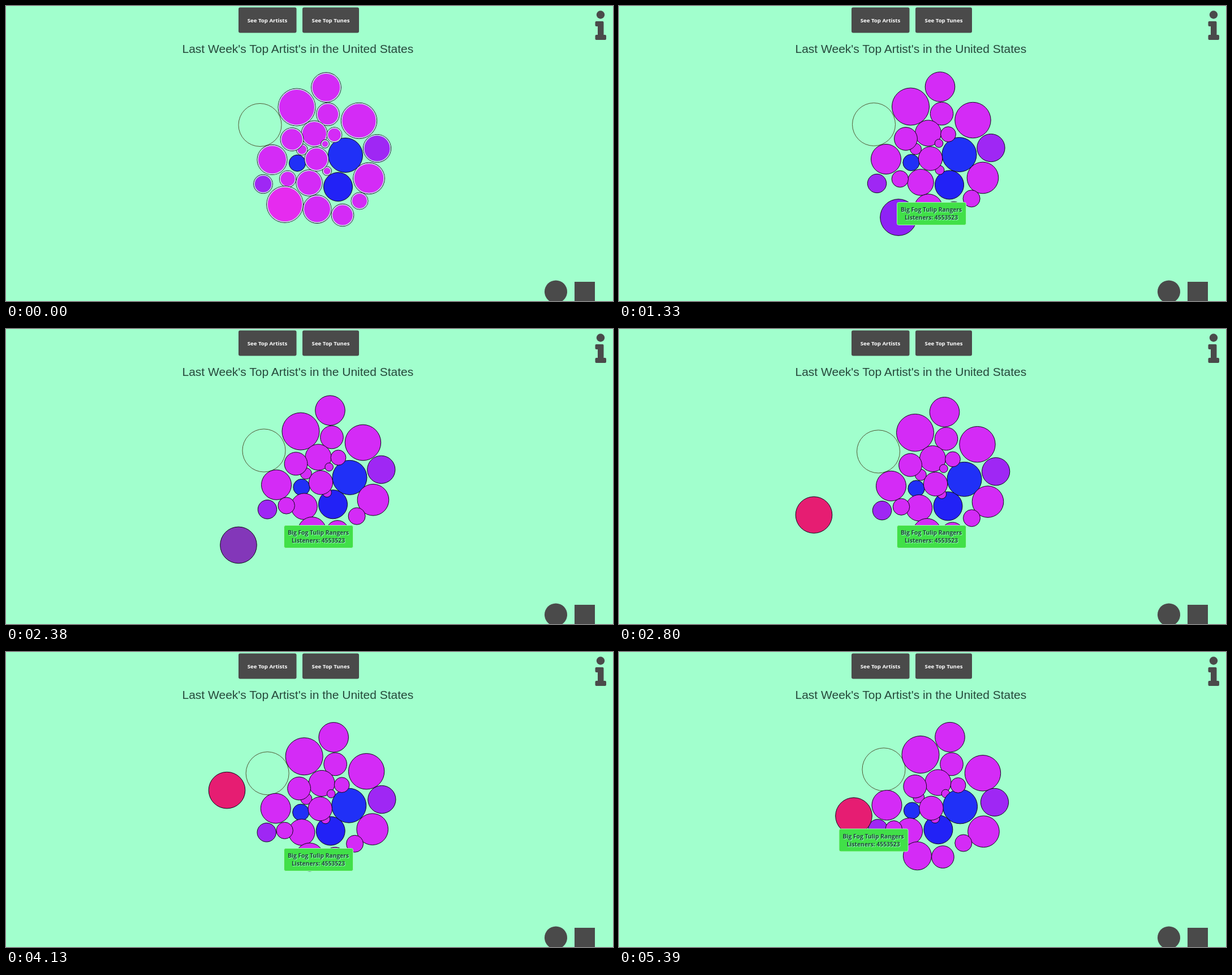
Recreate the animation shown at these times as an HTML page. Size 1073x522 px, loop 5.46 s.

```html
<!DOCTYPE html>
<html lang="en">
<head>
<meta charset="utf-8">
<title>Top artists bubbles</title>
<style>
  html, body { margin: 0; width: 100%; height: 100%; overflow: hidden; background: #a1ffcd; }
  svg { display: block; width: 1073px; height: 522px; }
  h1 {
    position: absolute; left: 311.5px; top: 64px; margin: 0; white-space: nowrap;
    font: 21px/24px "Liberation Sans", Arial, sans-serif; color: #26493b;
  }
  .ui { fill: #4a4a4a; }
  .btn { font: bold 9.65px "Open Sans", "Noto Sans", sans-serif; fill: #fff; text-anchor: middle; }
  .tip rect { fill: #41e048; stroke: #a0f8b4; stroke-width: 1; }
  .tip text {
    font: bold 10.3px "Open Sans", "Noto Sans", sans-serif;
    fill: #1f4738; text-anchor: middle; text-shadow: 1px 1px 1px #a1ffcd;
  }
  .bubble { stroke: #0c0818; stroke-width: 1; }
  .hollow { stroke: #3a2c0c; stroke-width: .8; }
  .ring { fill: none; stroke: #c4f8e4; stroke-width: 1.5; }
</style>
</head>
<body>
<h1>Last Week's Top Artist's in the United States</h1>
<svg viewBox="0 0 1073 522">
  <defs><clipPath id="area"><rect width="1073" height="422"/></clipPath></defs>
  <rect class="ui" x="411" y="2.5" width="102.5" height="45" rx="3"/>
  <rect class="ui" x="524" y="2.5" width="100" height="45" rx="3"/>
  <text class="btn" x="462" y="29">See Top Artists</text>
  <text class="btn" x="574" y="29">See Top Tunes</text>
  <g class="ui">
    <circle cx="1051" cy="15.5" r="7.2"/>
    <path d="M1043.5 27h11q2 0 2 2v22h2.5q2 0 2 2v5q0 2-2 2h-15.5q-2 0-2-2v-5q0-2 2-2h2.5v-15h-2.5q-2 0-2-2v-5q0-2 2-2z"/>
    <circle cx="972" cy="505.5" r="20"/>
    <rect x="1005" y="488" width="36" height="36"/>
  </g>
  <g id="bubbles" clip-path="url(#area)"></g>
  <g id="tip" class="tip">
    <rect x=".5" y=".5" width="122" height="40" rx="3"/>
    <text x="61" y="17">Big Fog Tulip Rangers</text>
    <text x="61" y="31">Listeners: 4553523</text>
  </g>
</svg>
<script>
const LOOP = 5460, STEP = 70;
const PINK = "#d42bf6", BLUE = "#2030f7", NAVY = "#2222f6", VIOLET = "#9f27f4";

// Resting cluster, back to front: x, y, radius, fill
const cluster = [
  [523, 254, 10], [449, 210.5, 38, "none"], [566, 144, 26.3], [514, 179, 33],
  [569, 191.5, 20.3], [545, 226, 23], [564, 244, 7.3], [624, 203, 31.7],
  [587, 320, 25.5, NAVY], [567.5, 292, 8], [600, 264, 30.5, BLUE], [580.5, 228, 13.4],
  [656, 252, 24.6, VIOLET], [470.5, 272, 26.5], [515, 278, 14.6, BLUE], [536, 313, 23.2],
  [505.5, 236, 20.4], [549, 271, 21.2], [454.5, 315, 16.7, VIOLET], [498, 306, 14.7],
  [641.5, 305, 27.8], [625, 345, 15], [550, 359.5, 25], [595, 370, 19.8]
];

// Key moments: drift of the whole cluster, its tilt, the shift of its
// upper half, and how far the lower bubbles close the gap
const keys = [
  { t: 0,    drag: [493, 351],   drift: [0, 0],      tilt: 0,     lean: 0,  sink: 0 },
  { t: 1330, drag: [494, 374],   drift: [1.5, -1],   tilt: 0,     lean: 0,  sink: .28 },
  { t: 1960, drag: [484, 427.7], drift: [4, -1.5],   tilt: -.04,  lean: 0,  sink: 1 },
  { t: 2800, drag: [344.5, 329], drift: [10.5, 3.5], tilt: -.03,  lean: -1, sink: 1 },
  { t: 3640, drag: [400.5, 269], drift: [8.5, 6],    tilt: -.018, lean: -1, sink: 1.05 },
  { t: 4620, drag: [379, 230],   drift: [4, 6.5],    tilt: .065,  lean: 15, sink: 1.4 },
  { t: 5390, drag: [415, 290],   drift: [3, 5],      tilt: .08,   lean: 16, sink: 1.6 }
];
const dragTints = [[230, 43, 239], [143, 34, 245], [32, 80, 255], [230, 29, 114]];

const clamp = v => Math.min(1, Math.max(0, v));
const mix = (a, b, u) => a + (b - a) * u;
const smooth = u => u * u * (3 - 2 * u);

function segment(t) {
  let i = 0;
  while (i < keys.length - 2 && t >= keys[i + 1].t) i++;
  return [i, clamp((t - keys[i].t) / (keys[i + 1].t - keys[i].t))];
}

// Hermite curve through one value of the key moments
function curve(get, t) {
  const [i, u] = segment(t), span = keys[i + 1].t - keys[i].t;
  const slope = j => j === 0 || j === keys.length - 1 ? 0 :
    .6 * span * (get(keys[j + 1]) - get(keys[j - 1])) / (keys[j + 1].t - keys[j - 1].t);
  return mix(get(keys[i]), get(keys[i + 1]), smooth(u)) +
    u * (1 - u) * ((1 - u) * slope(i) - u * slope(i + 1));
}

function poseAt(t) {
  const [x, y, dragX, dragY, tilt, lean, sink] = [
    k => k.drift[0], k => k.drift[1], k => k.drag[0], k => k.drag[1],
    k => k.tilt, k => k.lean, k => k.sink
  ].map(get => curve(get, t));
  return { x, y, dragX, dragY, tilt, lean, sink };
}

function place(x, y, pose) {
  const upper = 1 - smooth(clamp((y - 230) / 35));
  const gap = Math.hypot(x - 550, 1.6 * (y - 345));
  const pull = pose.sink * clamp((105 - gap) / 40);
  return [
    x + pose.x + pose.lean * upper - 16 * pull,
    y + pose.y + pose.tilt * (x - 545) - .17 * (x - 535) * pull
  ];
}

function tintAt(t) {
  const [i, u] = segment(t);
  if (i > 2) return `rgb(${dragTints[3]})`;
  return `rgb(${dragTints[i].map((c, k) => Math.round(mix(c, dragTints[i + 1][k], u)))})`;
}

const layer = document.getElementById("bubbles");
const tip = document.getElementById("tip");

function make(tag, parent, attrs) {
  const el = document.createElementNS("http://www.w3.org/2000/svg", tag);
  for (const name in attrs) el.setAttribute(name, attrs[name]);
  return parent.appendChild(el);
}

function bubble(x, y, r, fill = PINK) {
  const g = make("g", layer);
  const hollow = fill === "none", ringed = fill === PINK || fill === VIOLET;
  const disc = make("circle", g, { r, fill, class: hollow ? "bubble hollow" : "bubble" });
  const ring = ringed && make("circle", g, { r: r - 1.2, class: "ring" });
  return { x, y, g, disc, ring };
}

const bubbles = cluster.map(b => bubble(...b));
const dragged = bubble(0, 0, 32.3);

function draw(t) {
  const pose = poseAt(t);
  for (const b of [...bubbles, dragged]) {
    const [x, y] = b === dragged ? [pose.dragX, pose.dragY] : place(b.x, b.y, pose);
    b.g.setAttribute("transform", `translate(${x.toFixed(2)} ${y.toFixed(2)})`);
    if (b.ring) b.ring.style.display = t < STEP ? "" : "none";
  }
  dragged.disc.setAttribute("fill", tintAt(t));
  const shown = t >= 420 && t < 1750 || t >= 2380;
  tip.style.display = shown ? "" : "none";
  tip.setAttribute("transform", t < 5180 ? "translate(491 347)" : "translate(388.5 312.5)");
}

const begin = performance.now();
function tick() {
  const t = (performance.now() - begin) % LOOP;
  draw(Math.floor(t / STEP) * STEP);
  requestAnimationFrame(tick);
}
tick();
</script>
</body>
</html>
```
